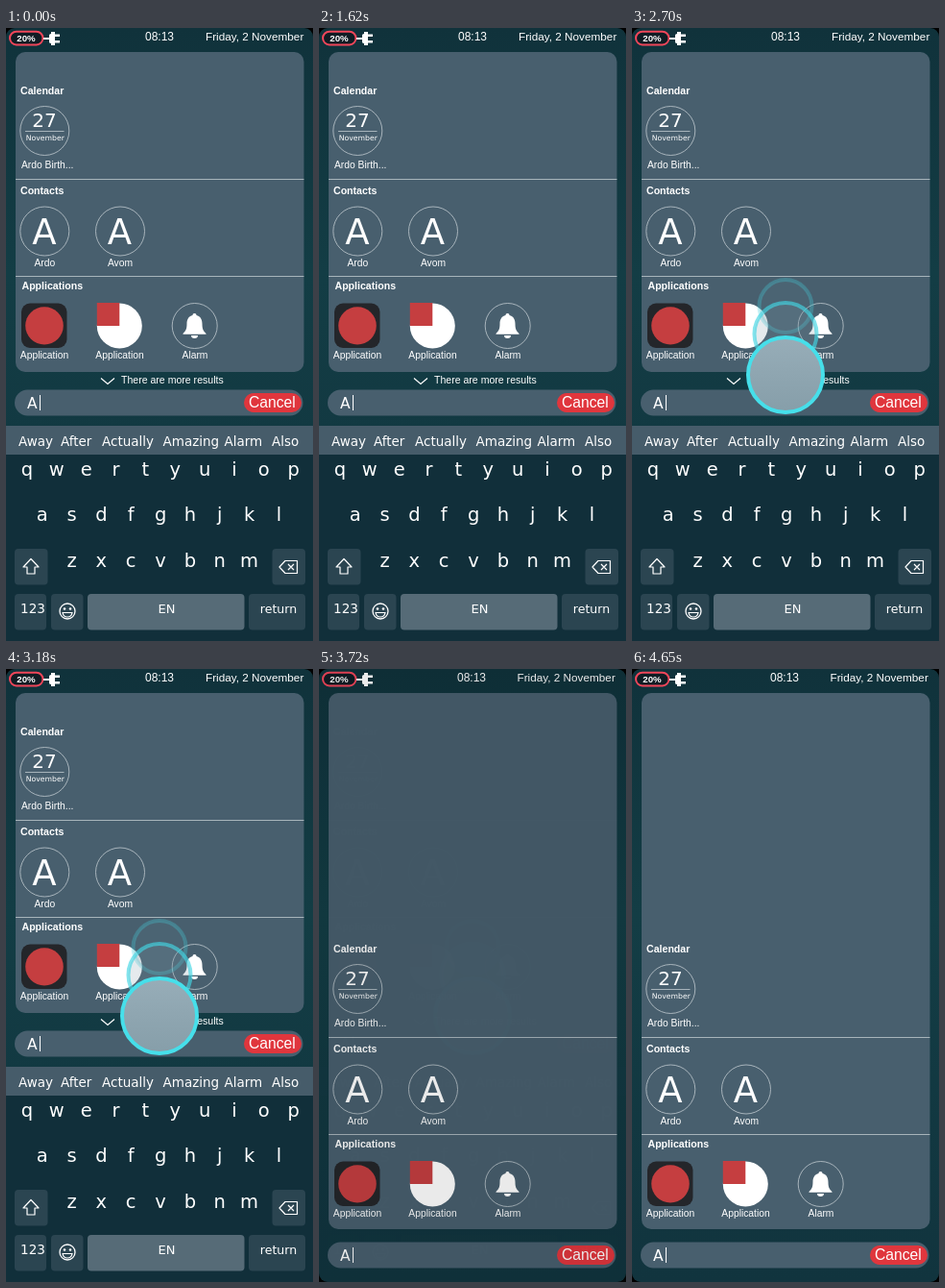
An HTML page that plays this animation: 320 by 638 pixels, repeating every 4680 ms.

```html
<!DOCTYPE html>
<html lang="en">
<head>
<meta charset="utf-8">
<title>Search on a phone</title>
<style>
html, body { margin: 0; width: 100%; height: 100%; overflow: hidden; background: #000; }
svg { display: block; width: 320px; height: 638px; }
text { fill: #fff; font-family: "Liberation Sans", Arial, sans-serif; font-size: 10.3px; white-space: pre; }
.bold { font-weight: bold; font-size: 10.6px; }
.wide { font-family: "DejaVu Sans", Verdana, sans-serif; }
.line { fill: none; stroke: #fff; }
.thin { fill: none; stroke: #b3bec5; stroke-width: .9px; }
</style>
</head>
<body>
<svg id="stage" viewBox="0 0 320 638"></svg>
<script>
const LOOP = 4680, FADE = 280, SWIPE_AT = 1730, LIST_AT = 3464;
const PANEL = '#485f6e', RED = '#c53e40', KEY = '#2b4551';

const text = (x, y, s, size, cls = '', anchor = 'start') =>
  `<text x="${x}" y="${y}" class="${cls}" text-anchor="${anchor}"${size ? ` style="font-size:${size}px"` : ''}>${s}</text>`;
const label = (x, y, s, size, cls) => text(x, y, s, size, cls, 'middle');
const rect = (x, y, w, h, r, fill, extra = '') =>
  `<rect x="${x}" y="${y}" width="${w}" height="${h}" rx="${r}" fill="${fill}" ${extra}/>`;
const circle = (x, y, r, attrs) => `<circle cx="${x}" cy="${y}" r="${r}" ${attrs}/>`;
const path = (d, attrs) => `<path d="${d}" ${attrs}/>`;
const group = (dy, s) => `<g transform="translate(0 ${dy})">${s}</g>`;

const statusBar = shift =>
  rect(4, 3.8, 34.5, 13.6, 6.8, '#101c24', 'stroke="#f0465a" stroke-width="2"') +
  label(21, 14, '20%', 9.7, 'bold') +
  path('M39 11h7', 'class="line" stroke-width="2"') +
  path('M45 7.5q0-1.5 2-1.5V4h4v2.5h5v2.5h-5v4h5v2.5h-5V18h-4v-2q-2 0-2-1.5z', 'fill="#fff"') +
  text(145 - shift, 13.3, '08:13', 12) +
  text(208 - shift * 1.5, 13.3, 'Friday, 2 November', 11.75);

const contact = (x, name) =>
  circle(x, 211.5, 25.5, 'class="thin"') + label(x - .5, 225, 'A', 37, 'wide') + label(x, 247.7, name);

const results = () =>
  text(15, 68.6, 'Calendar', 0, 'bold') +
  circle(40.3, 107, 25.5, 'class="thin"') + path('M20 107.5h40.5', 'class="thin"') +
  label(40, 103, '27', 20, 'wide') + label(40.8, 117, 'November', 7.7, 'wide') +
  text(16, 146.2, 'Ardo Birth...') +
  path('M10 157.5h300.5M10 258.5h300.5', 'class="thin"') +
  text(15, 173.2, 'Contacts', 0, 'bold') + contact(40.3, 'Ardo') + contact(119, 'Avom') +
  text(16.5, 272.4, 'Applications', 0, 'bold') +
  rect(16, 286.5, 47.5, 46.5, 9, '#24262a') +
  `<ellipse cx="40" cy="309.8" rx="19.8" ry="19.6" fill="${RED}"/>` +
  circle(118.3, 310, 23.5, 'fill="#fff"') + rect(94.8, 286, 23.5, 24, 0, RED) +
  circle(196.7, 310, 23.5, 'class="thin"') +
  path('M196.500 297c-1.400 0-2 .9-2 2-4.300 1-6 4.500-6 9 0 6-1.500 7.500-4 10v.8h24v-.8c-2.500-2.500-4-4-4-10 0-4.500-1.700-8-6-9 0-1.100-.6-2-2-2zM193 320a3.500 3 0 0 0 7 0z', 'fill="#fff"') +
  label(40, 344, 'Application') + label(118.5, 344, 'Application') + label(197, 344, 'Alarm');

const searchField = () =>
  rect(9, 376.5, 300.5, 27, 13.5, PANEL) +
  text(22, 396, 'A', 15.5, 'wide') + path('M35.500 382v16', 'class="line"') +
  rect(248, 380, 60, 20, 10, '#e0363d') + label(277.3, 395.3, 'Cancel', 15.7);

const letters = (x, y, s) =>
  [...s].map((c, i) => label(x + i * 30.85, y, c, 19.5, 'wide')).join('');

const keyboard = () => {
  const words = { Away: 13, After: 57, Actually: 100, Amazing: 163.5, Alarm: 227.5, Also: 277 };
  return rect(0, 444, 320, 194, 0, '#112f3a') + rect(0, 414, 320, 30, 0, '#465c6a') +
    Object.entries(words).map(([w, x]) => text(x, 435, w, 13.5, 'wide')).join('') +
    letters(22, 465.5, 'qwertyuiop') + letters(37.7, 513, 'asdfghjkl') + letters(68.5, 561.3, 'zxcvbnm') +
    rect(9, 542, 34.5, 37.5, 4, KEY) + rect(277.5, 542, 34.5, 37.5, 4, KEY) +
    rect(9, 589, 33, 37.5, 4, KEY) + rect(47, 589, 33.5, 37.5, 4, KEY) +
    rect(85, 589, 163.5, 37.5, 4, '#566b77') + rect(253, 589, 59, 37.5, 4, KEY) +
    path('M26 552.500l8 8.500h-4v7h-8v-7h-4z', 'class="line" stroke-width="1.2" stroke-linejoin="round"') +
    path('M285 561l6-6.500h12.500v13h-12.500zM294 558l6 6m0-6l-6 6', 'class="line" stroke-width="1.2" stroke-linejoin="round"') +
    label(28, 609, '123', 13.5, 'wide') +
    circle(64, 607, 8, 'class="line" stroke-width="1.3"') +
    circle(61, 604.5, 1.3, 'fill="#fff"') + circle(67, 604.5, 1.3, 'fill="#fff"') +
    path('M59 608.500h10q-.8 4.500-5 4.500t-5-4.500z', 'class="line" stroke-width="1.2"') +
    label(167.5, 609.3, 'EN', 13, 'wide') + label(284, 608.5, 'return', 12.6, 'wide');
};

const screen = (panelHeight, shift, content) =>
  rect(0, 0, 320, 638, 9, 'url(#backdrop)') + statusBar(shift) +
  rect(10, 25, 300.5, panelHeight, 10, PANEL) + content;

const typing = () => screen(333, 0, results() +
  path('M99 364.500l7 6 7-6', 'class="line" stroke-width="1.2"') +
  text(120, 370.2, 'There are more results', 10.55) + searchField() + keyboard());

const swipe = () =>
  circle(160, 289.5, 27.5, 'fill="#5f8090" fill-opacity=".15" stroke="#43cfdc" stroke-opacity=".3" stroke-width="4"') +
  circle(160, 318.500, 32.5, 'fill="#7c97a4" fill-opacity=".2" stroke="#43d6e3" stroke-opacity=".65" stroke-width="4"') +
  circle(160, 361, 39, 'fill="url(#touch)" stroke="#46dfea" stroke-width="4"');

const fullList = () => screen(558, 1, group(226, results()) + group(220, searchField()));

const stage = document.getElementById('stage');
stage.innerHTML = `<defs>
  <linearGradient id="backdrop" x2="0" y2="1">
    <stop stop-color="#10323b"/><stop offset=".4" stop-color="#133d45"/><stop offset="1" stop-color="#11343e"/>
  </linearGradient>
  <linearGradient id="touch" x2="0" y2="1">
    <stop stop-color="#97adb8"/><stop offset="1" stop-color="#869ea9"/>
  </linearGradient></defs>` +
  [typing(), swipe(), fullList()].map(s => `<g>${s}</g>`).join('');
const layers = stage.querySelectorAll(':scope > g');

// The touch fades in over the first screen, then both dissolve into the full list over black.
function draw() {
  const t = performance.now() % LOOP;
  const progress = start => Math.min(1, Math.max(0, (t - start) / FADE));
  const touch = progress(SWIPE_AT), list = progress(LIST_AT);
  [1 - list, touch * (1 - list), list].forEach((opacity, i) => {
    layers[i].style.opacity = opacity;
    layers[i].style.display = opacity ? '' : 'none';
  });
  requestAnimationFrame(draw);
}
draw();
</script>
</body>
</html>
```
